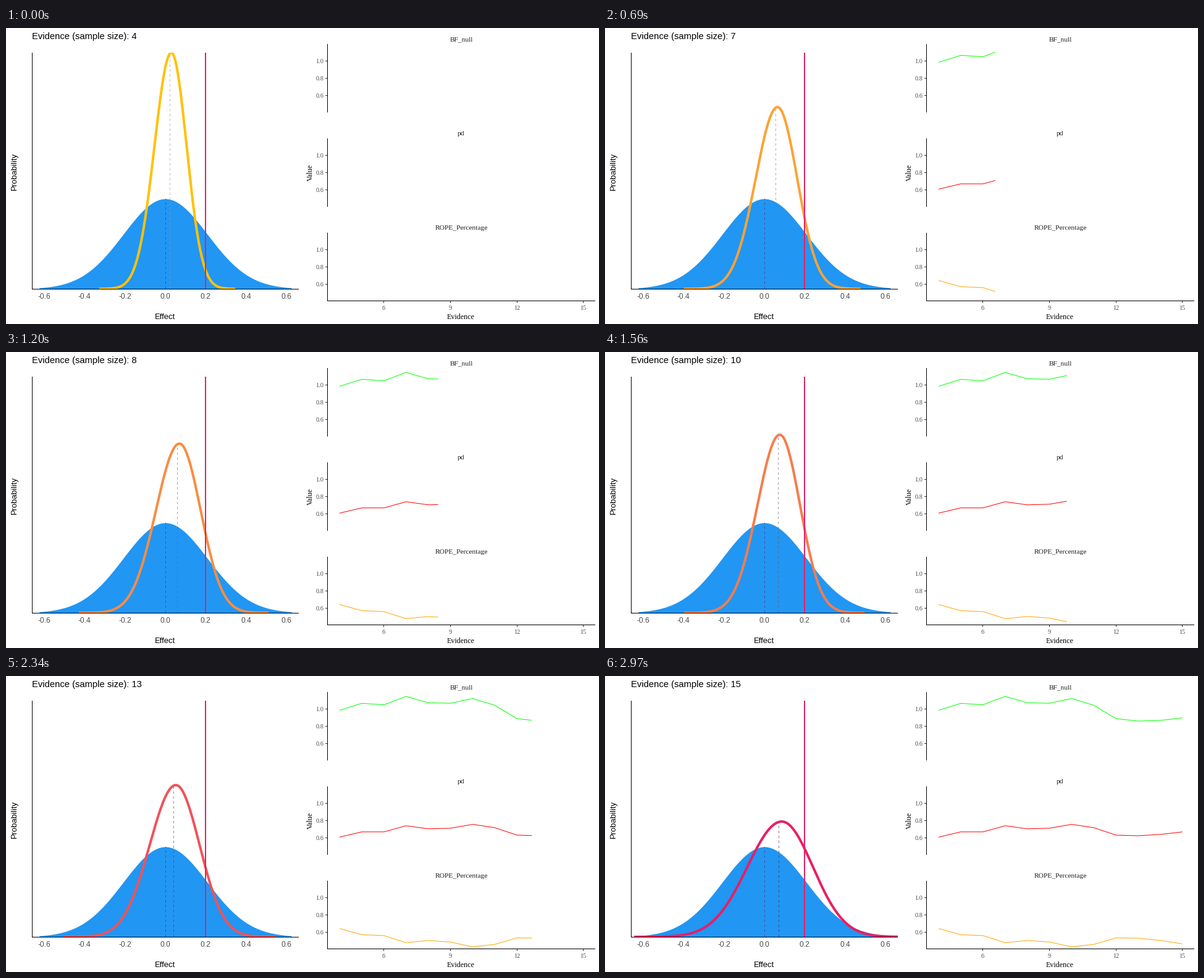
A matplotlib script for the animation above (3000 ms loop, 960 px wide and 480 px high).

```python
import numpy as np
import matplotlib.pyplot as plt
from matplotlib.animation import FuncAnimation
from matplotlib.patches import Rectangle

W, H, DPI = 960, 480, 100
FRAMES, INTERVAL = 100, 30
PT = 72 / DPI
BASE, ZERO, UNIT = 423, 257.9, 327.5   # left panel: baseline, x of 0, px per unit
PRIOR_SD, PRIOR_TOP = 68, 146
AREA = PRIOR_SD * PRIOR_TOP
STEP, SLOPE = 35.9, 142                # right panels: px per sample, px per unit
SANS, SERIF = "Liberation Sans", "Liberation Serif"
GREY, PINK = "#4D4D4D", "#E91E63"

fig = plt.figure(figsize=(W / DPI, H / DPI), dpi=DPI, facecolor="white")
ax = fig.add_axes([0, 0, 1, 1])
ax.set(xlim=(0, W), ylim=(H, 0))
ax.axis("off")


def line(x, y, color="black", width=1, **kw):
    return ax.plot(x, y, color=color, lw=width * PT, snap=False,
                   solid_capstyle="butt", dash_capstyle="butt", **kw)[0]


def dashed(x, top, color, **kw):
    return line([x, x], [BASE, top], color, linestyle=(0, (4, 4)), **kw)


def label(x, y, s, size, font=SANS, color="black", ha="center", rot=0):
    return ax.text(x, y, s, fontsize=size * PT, family=font, color=color, ha=ha,
                   va="baseline", rotation=rot, rotation_mode="anchor")


def pixel(v):
    return np.floor(v) + .5


# Colour blending in CIE Lab
RGB_XYZ = np.array([[.4124, .3576, .1805], [.2126, .7152, .0722], [.0193, .1192, .9505]])
WHITE = RGB_XYZ.sum(axis=1)


def to_lab(rgb):
    c = np.array(rgb) / 255
    c = np.where(c > .04045, ((c + .055) / 1.055) ** 2.4, c / 12.92)
    t = RGB_XYZ @ c / WHITE
    f = np.where(t > .008856, np.cbrt(t), 7.787 * t + 16 / 116)
    return np.array([f[1], f[0] - f[1], f[1] - f[2]])


def from_lab(lab):
    f = np.array([lab[0] + lab[1], lab[0], lab[0] - lab[2]])
    t = np.where(f > .2069, f ** 3, (f - 16 / 116) / 7.787)
    c = np.clip(np.linalg.solve(RGB_XYZ, t * WHITE), 0, 1)
    return np.clip(np.where(c > .0031308, 1.055 * c ** (1 / 2.4) - .055, 12.92 * c), 0, 1)


def blend(start, end, t):
    a, b = to_lab(start), to_lab(end)
    return from_lab(a + (b - a) * t)


# Probability of direction per sample; the other indices follow it with a drift
STATES = np.arange(4, 16)
PD = np.array([.614, .674, .674, .744, .709, .716, .76, .722, .637, .63, .645, .674])
GAIN, AGE = PD - PD[0], STATES - 4
INDICES = [
    ("BF_null", 53, "#00FF00", .985 + 1.6 * GAIN - .0165 * AGE),
    ("pd", 206, "#FF0000", PD),
    ("ROPE_Percentage", 359, "#FFA500", .648 - GAIN - .0105 * AGE),
]


def bell(x, mode, left, right, height):
    d = x - mode
    return BASE - height * np.exp(-.5 * (d / np.where(d < 0, left, right)) ** 2)


def posterior(n):
    """Slightly skewed bell with the prior's area and a median set by pd."""
    height = np.interp(n, [4, 5.2, 8.4, 11, 12.7, 15], [383, 310, 274, 302, 245, 187])
    sd = AREA / height
    mid = ZERO + 2.6 * sd * (np.interp(n, STATES, PD) - .5)
    mode = mid + .08 * sd
    x = np.linspace(mode - 4.5 * sd, mode + 4 * sd, 320)
    return x, bell(x, mode, 1.05 * sd, .95 * sd, height), mid, BASE - height


# Left panel
panel = Rectangle((42, 40), 432, BASE - 40, transform=ax.transData)
px = np.linspace(ZERO - 3 * PRIOR_SD, ZERO + 3 * PRIOR_SD, 400)
ax.fill_between(px, bell(px, ZERO, PRIOR_SD, PRIOR_SD, PRIOR_TOP), BASE,
                color="#2196F3", lw=0)
dashed(258.5, BASE - PRIOR_TOP, "#4A4FA8")
median = dashed(0, 0, "black", alpha=.6)
curve = line([], [], width=4, solid_joinstyle="round")
curve.set_clip_path(panel)
line([323, 323], [40, BASE], PINK, 2)
line([42.5, 42.5], [40, BASE + 1])
line([42, 474], [BASE + .5] * 2)
for v in np.arange(-6, 7, 2) / 10:
    label(ZERO + UNIT * v, 439, f"{v:.1f}", 12, color=GREY)
label(257.5, 472, "Effect", 13)
label(17, 232.5, "Probability", 13, rot=90)
title = label(42, 18, "", 14.75, ha="left")


# Right panels
def ev_x(n):
    return 540 + STEP * (n - 4)


traces = []
for name, one, color, values in INDICES:
    label(737, one - 32, name, 11.5, SERIF, "#1A1A1A")
    traces.append((line([], [], color), one + .5 + SLOPE * (1 - values)))
    line([520.5, 520.5], [one - 27, one + 84])
    for v in (1, .8, .6):
        y = pixel(one + SLOPE * (1 - v))
        line([517, 520], [y, y], "#333333")
        label(514.5, y + 3.8, f"{v:.1f}", 10.2, SERIF, GREY, "right")
line([520, 954], [442.5, 442.5])
for n in (6, 9, 12, 15):
    x = pixel(ev_x(n))
    line([x, x], [443, 446], "#333333")
    label(x, 457.3, str(n), 10.2, SERIF, GREY)
label(736.5, 472, "Evidence", 12, SERIF)
label(496, 234.5, "Value", 12, SERIF, rot=90)


def update(i):
    t = i / (FRAMES - 1)
    n = 4 + 11 * t
    title.set_text(f"Evidence (sample size): {round(n)}")
    x, y, mid, top = posterior(n)
    curve.set_data(x, y)
    curve.set_color(blend((255, 193, 7), (233, 30, 99), t))
    median.set_data([pixel(mid)] * 2, [BASE, top])
    median.set_color(blend((150, 150, 150), (90, 20, 60), t))
    seen = np.append(STATES[STATES < n - 1e-9], n)
    for trace, ys in traces:
        trace.set_data(ev_x(seen), np.interp(seen, STATES, ys))
    return [title, curve, median] + [trace for trace, _ in traces]


anim = FuncAnimation(fig, update, frames=FRAMES, interval=INTERVAL,
                     repeat=True, repeat_delay=0)
plt.show()
```
